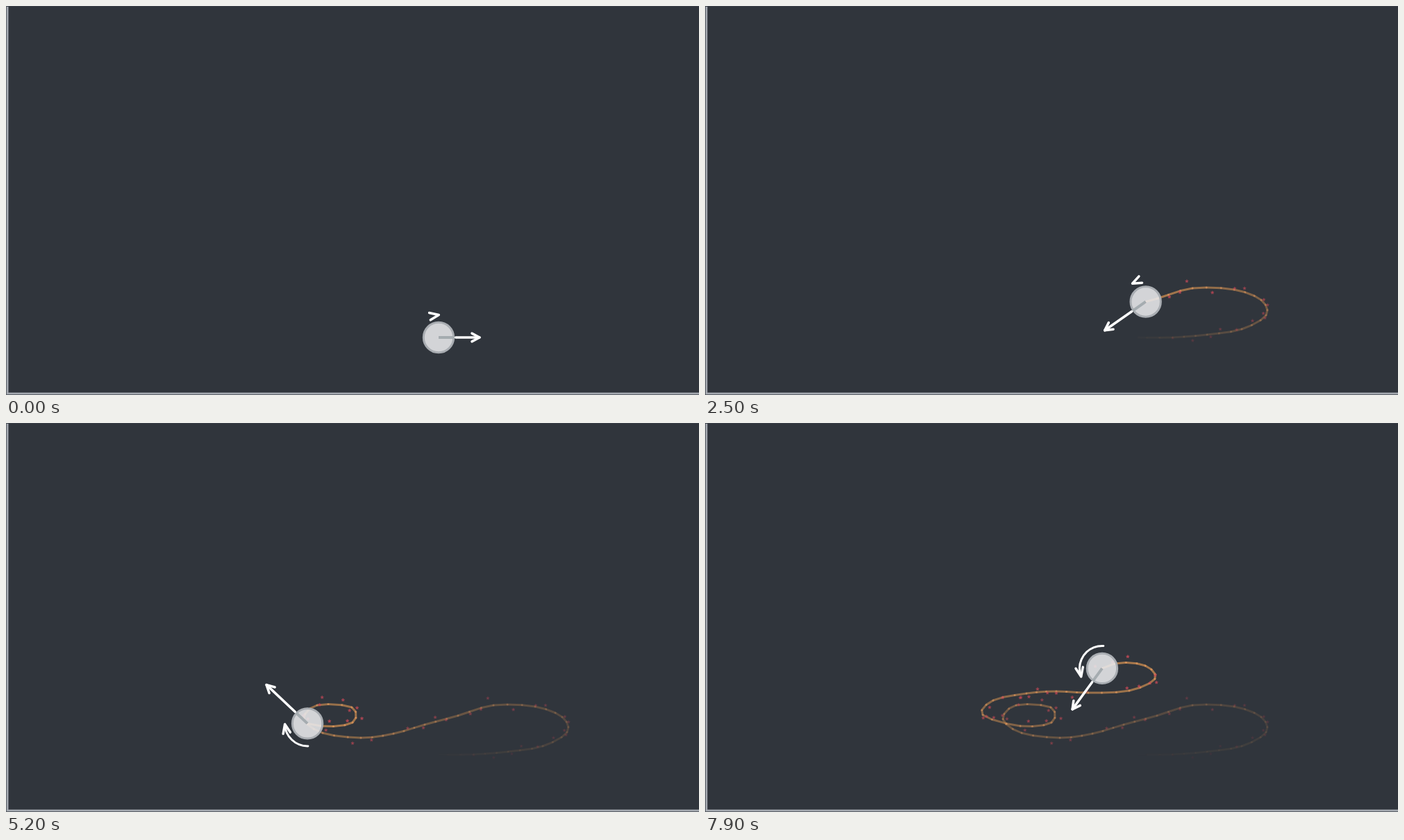
Animation, 998 px wide and 561 px high, one loop 8 s. Source, as an HTML page with a canvas:

```html
<!DOCTYPE html>
<html>
<head>
<meta charset="utf-8">
<title>Robot path</title>
<style>
html, body { margin: 0; width: 100%; height: 100%; overflow: hidden; background: #30353c; }
canvas { display: block; }
</style>
</head>
<body>
<canvas id="stage" width="998" height="561"></canvas>
<script>
const ctx = document.getElementById('stage').getContext('2d');
const STEP = 100, COUNT = 80, GAP = 3, RAD = Math.PI / 180;

// Key points of the drive, one every GAP steps, joined by a spline
const keys = [
  [623, 478], [673, 478], [723, 474], [773, 466], [808, 446], [801, 424], [762, 409],
  [702, 407], [651, 422], [603, 435], [558, 448], [511, 454], [456, 447], [429, 427],
  [448, 407], [498, 410], [499, 432], [454, 437], [400, 421], [415, 400], [463, 390],
  [506, 387], [552, 389], [611, 386], [648, 369], [634, 350], [590, 347], [540, 371]
];

// Steering: step, heading in degrees, turn rate in degrees per step
const steer = [
  [0, 0, 0.2], [9, -45, -10], [14, -108, -12.7], [25, -215, -0.5], [33, -170, 13],
  [44, 32, 27], [57, 318, 17], [60, 349, 0.5], [79, 126, -26.7]
];

function spline(a, b, c, d, u) {
  return b + u / 2 * (c - a + u * (2 * a - 5 * b + 4 * c - d + u * (3 * (b - c) + d - a)));
}

function place(k) {
  const i = Math.floor(k / GAP), u = k / GAP - i;
  const at = j => keys[Math.min(Math.max(j, 0), keys.length - 1)];
  return [0, 1].map(n => spline(at(i - 1)[n], at(i)[n], at(i + 1)[n], at(i + 2)[n], u));
}

// Cubic between two steering keys: heading and its slope
function course(k) {
  let i = 1;
  while (steer[i][0] < k) i++;
  const [k0, h0, r0] = steer[i - 1], [k1, h1, r1] = steer[i];
  const n = k1 - k0, s = (k - k0) / n, d = (h1 - h0) / n;
  const p = 3 * d - 2 * r0 - r1, q = r0 + r1 - 2 * d;
  return {
    angle: (h0 + n * s * (r0 + s * (p + s * q))) * RAD,
    rate: r0 + s * (2 * p + 3 * s * q)
  };
}

let seed = 7;
function random() {
  seed = (seed * 16807) % 2147483647;
  return seed / 2147483647;
}

const path = Array.from({ length: COUNT }, (_, k) => place(k));

// Noisy position readings close to the path
const marks = [];
path.forEach(([x, y], k) => {
  const dx = random() + random() - 1, dy = random() + random() - 1;
  if (k > 2 && random() < 0.7) marks.push({ x: x + 11 * dx, y: y + 11 * dy, k });
});

function line(points, color, width) {
  ctx.strokeStyle = color;
  ctx.lineWidth = width;
  ctx.beginPath();
  points.forEach(([x, y]) => ctx.lineTo(x, y));
  ctx.stroke();
}

const polar = (x, y, r, a) => [x + r * Math.cos(a), y + r * Math.sin(a)];

function head(x, y, a, len, spread) {
  const wing = s => polar(x, y, len, a + Math.PI + s * spread * RAD);
  line([wing(-1), [x, y], wing(1)], '#fff', 3.5);
}

function frame() {
  const box = (color, ...r) => { ctx.fillStyle = color; ctx.fillRect(...r); };
  box('#30353c', 0, 0, 998, 561);
  box('#3a3f47', 0, 0, 998, 1);
  box('#5b6067', 0, 0, 1, 561);
  box('#5b6067', 0, 560, 998, 1);
  box('#a5aab1', 1, 1, 2.5, 559);
  box('#a5aab1', 1, 557.5, 997, 2.5);
}

function trail(k) {
  ctx.lineCap = 'butt';
  for (let i = 1; i <= k; i++) {
    ctx.globalAlpha = 0.75 * i / k;
    line([path[i - 1], path[i]], '#d49252', 3);
    ctx.fillStyle = '#ee9f68';
    ctx.beginPath();
    ctx.arc(...path[i], 1.5, 0, 7);
    ctx.fill();
  }
  for (const m of marks.filter(m => m.k <= k)) {
    ctx.globalAlpha = 0.75 * m.k / k;
    for (let s = 0; s < 5; s++) {
      line([[m.x, m.y], polar(m.x, m.y, 2.4, (s * 72 - 90) * RAD)], '#c84a58', 1.5);
    }
  }
  ctx.globalAlpha = 1;
}

function robot(k) {
  const [x, y] = path[k], { angle, rate } = course(k);
  ctx.fillStyle = 'rgba(232,232,234,0.89)';
  ctx.beginPath();
  ctx.arc(x, y, 21.7, 0, 7);
  ctx.fill();
  ctx.strokeStyle = '#a9adb2';
  ctx.lineWidth = 3;
  ctx.stroke();
  line([[x, y], polar(x, y, 22, angle)], '#a5acb0', 4);

  // The heading arrow ends on a square around the robot
  ctx.lineCap = ctx.lineJoin = 'round';
  const reach = 59 / Math.max(Math.abs(Math.cos(angle)), Math.abs(Math.sin(angle)));
  const tip = polar(x, y, reach, angle);
  line([polar(x, y, 24.5, angle), tip], '#fff', 3.5);
  head(...tip, angle, 12.5, 28);

  // Turn arrow on the outer side of the curve
  const dir = rate < 0 ? -1 : 1, half = 2.15 * Math.abs(rate) * RAD;
  const mid = angle - dir * Math.PI / 2, end = mid + dir * half;
  ctx.lineWidth = 3;
  ctx.beginPath();
  ctx.arc(x, y, 32.5, mid - half, mid + half);
  ctx.stroke();
  head(...polar(x, y, 32.5, end), end + dir * 80 * RAD, 14, 22);
}

function draw(time) {
  const k = Math.floor(time / STEP) % COUNT;
  frame();
  trail(k);
  robot(k);
}

const start = performance.now();
function tick() {
  draw(performance.now() - start);
  requestAnimationFrame(tick);
}
tick();
</script>
</body>
</html>
```
